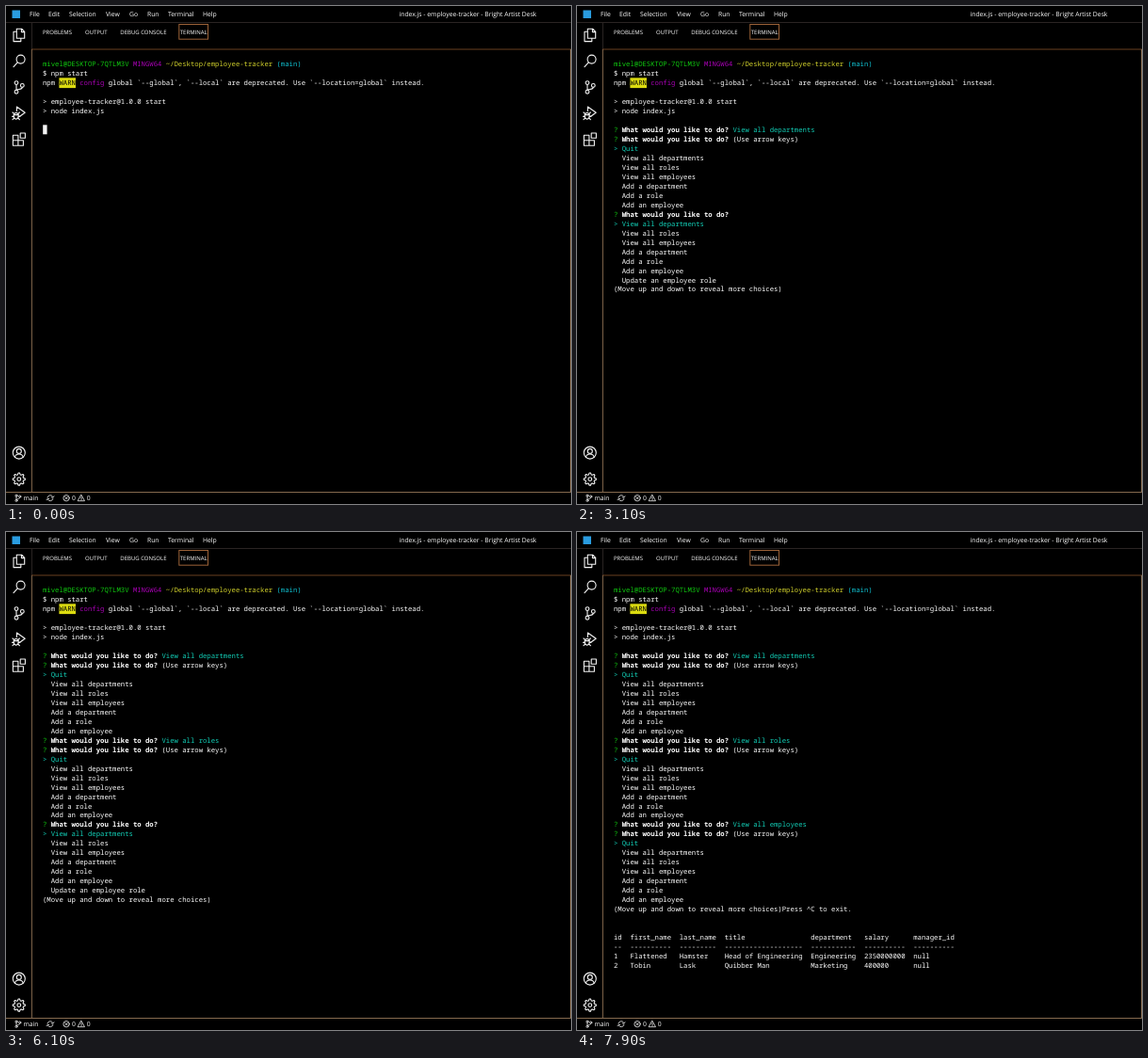
Write an HTML page that moves like this. It is 600 by 529 pixels and loops after 8 s.

```html
<!DOCTYPE html>
<html lang="en">
<head>
<meta charset="utf-8">
<title>employee-tracker</title>
<style>
html, body { margin: 0; width: 100%; height: 100%; overflow: hidden; background: #000; }
svg { display: block; width: 600px; height: 529px; background: #000; }
text { fill: #fff; white-space: pre; text-rendering: geometricPrecision; }
.ui text { font: 6.8px "Open Sans", "Noto Sans", sans-serif; }
.ui .tabs text { font-size: 6px; }
.term text { font: 7.27px "Noto Sans Mono", "DejaVu Sans Mono", monospace; }
.icon { fill: none; stroke: #f4f4f4; stroke-width: 1.1; stroke-linejoin: round; stroke-linecap: round; }
.small { stroke-width: .8; }
.g { fill: #10cc10; }
.m { fill: #a800b4; }
.y { fill: #d2d22c; }
.c { fill: #12d0b8; }
.e { fill: #10c4d4; }
.k { fill: #000; }
.b { font-weight: 700; }
</style>
</head>
<body>
<svg viewBox="0 0 600 529" xmlns="http://www.w3.org/2000/svg">
  <g fill="none">
    <path d="M0 17.5H600M27.5 17.5V46" stroke="#2a2423"/>
    <path d="M27 46H600" stroke="#6b4020"/>
    <path d="M27.4 46V516.5M599.5 46V516.5" stroke="#84694e"/>
    <path d="M0 516.5H600" stroke="#84694e"/>
    <rect x="183.8" y="19.5" width="30.7" height="15.7" stroke="#9c6238"/>
  </g>

  <rect x="6.5" y="4.5" width="8.5" height="8.5" fill="#2a9ce0"/>

  <g class="ui">
    <g id="menu"></g>
    <g id="tabs" class="tabs"></g>
    <g id="status"></g>
  </g>

  <!-- activity bar -->
  <g class="icon" transform="translate(0 -.4)">
    <path d="M11.3 24.6H16.6L19.7 27.7V34.6H11.3ZM16.4 24.8V28H19.5M11 27.6H8V38H15.8V34.8"/>
    <circle cx="15.6" cy="57" r="4.5"/><path d="M12.3 60.3L8 65"/>
    <circle cx="11" cy="82" r="1.9"/><circle cx="11" cy="91.6" r="1.9"/><circle cx="17.3" cy="84.8" r="1.9"/>
    <path d="M11 84V89.6M17.3 86.8C17 89 14.5 88.6 11.6 89.4"/>
    <path d="M11.4 112V107.4L20.2 113.6L14.6 117.6"/>
    <ellipse cx="10.7" cy="117.2" rx="2.5" ry="3.3"/>
    <path d="M8.3 116H13.1M7 113.4L8.7 115M14.4 113.4L12.7 115M6.6 117.8H8M13.4 117.8H14.8M7 121L8.8 119.4M14.4 121L12.6 119.4"/>
    <path d="M7.4 137.6H12.9V143.1H18.4V148.6H7.4ZM7.4 143.1H12.9V148.6"/>
    <rect x="15.2" y="135.4" width="5.2" height="5.2"/>
    <circle cx="13.8" cy="475" r="6.5"/><circle cx="13.8" cy="473.3" r="2.5"/>
    <path d="M9.5 479.7C10 475.3 17.6 475.3 18.1 479.7"/>
    <path id="gear"/><circle cx="13.8" cy="503" r="1.9"/>
  </g>

  <!-- status bar -->
  <g class="icon small" transform="translate(0 -.3)">
    <circle cx="11" cy="520.4" r="1.1"/><circle cx="11" cy="525.6" r="1.1"/><circle cx="14.7" cy="521.4" r="1.1"/>
    <path d="M11 521.5V524.5M14.7 522.5C14.5 524 12.5 523.7 11.4 524.6"/>
    <path d="M44 522.4A3.1 3.1 0 0 1 49.6 521.4M50 523.6A3.1 3.1 0 0 1 44.4 524.6M48.3 522.2L49.9 522.4L50.9 521M45.7 523.8L44.1 523.6L43.1 525"/>
    <circle cx="64.1" cy="523" r="3.2"/><path d="M62.8 521.7L65.4 524.3M65.4 521.7L62.8 524.3"/>
    <path d="M80 519.7L83.5 526H76.5ZM80 521.9V523.8M80 524.9V525"/>
  </g>

  <rect x="56.4" y="76.3" width="17.6" height="10.8" fill="#dcdc10"/>
  <g id="term" class="term"></g>
  <rect id="cursor" x="39.2" y="126.3" width="4.4" height="10" fill="#f4f4f4"/>
</svg>
<script>
const LOOP = 8000, LEFT = 39, TOP = 64.2, ROW = 9.97;
const $ = id => document.getElementById(id);
const esc = s => s.replace(/&/g, '&amp;').replace(/</g, '&lt;').replace(/>/g, '&gt;');
const labels = (id, y, items) => {
  $(id).innerHTML = items.map(([x, s]) => `<text x="${x}" y="${y}">${s}</text>`).join('');
};

labels('menu', 11.4, [[25, 'File'], [45, 'Edit'], [67, 'Selection'], [106, 'View'], [131, 'Go'],
  [150, 'Run'], [172, 'Terminal'], [209, 'Help'],
  [417.5, 'index.js - employee-tracker - Bright Artist Desk']]);
labels('tabs', 29.6, [[39, 'PROBLEMS'], [84, 'OUTPUT'], [121.3, 'DEBUG CONSOLE'], [184.8, 'TERMINAL']]);
labels('status', 525.2, [[18.5, 'main'], [70, '0'], [85.8, '0']]);

// eight-toothed outline: two points out, two points in per tooth
$('gear').setAttribute('d', 'M' + Array.from({ length: 32 }, (_, i) => {
  const a = (i - 0.5) * Math.PI / 16, r = i % 4 < 2 ? 6.6 : 4.9;
  return (13.8 + r * Math.cos(a)).toFixed(2) + ' ' + (503 + r * Math.sin(a)).toFixed(2);
}).join('L') + 'Z');

// a line is a list of [class, text] pieces
const plain = s => [['', s]];
const choices = ['Quit', 'View all departments', 'View all roles', 'View all employees',
  'Add a department', 'Add a role', 'Add an employee', 'Update an employee role'];
const more = '(Move up and down to reveal more choices)';

const head = [
  [['g', 'mivel@DESKTOP-7QTLM3V'], ['m', ' MINGW64'], ['y', ' ~/Desktop/employee-tracker'], ['e', ' (main)']],
  plain('$ npm start'),
  [['', 'npm '], ['k', 'WARN'], ['m', ' config'],
    ['', ' global `--global`, `--local` are deprecated. Use `--location=global` instead.']],
  [],
  plain('> employee-tracker@1.0.0 start'),
  plain('> node index.js'),
  []
];

const ask = (cls, tail) => [['g', '? '], ['b', 'What would you like to do? '], [cls, tail]];
const list = (first, active) => choices.slice(first, first + 7).map((s, i) =>
  first + i === active ? [['c', '> ' + s]] : plain('  ' + s));
const opening = [ask('', '(Use arrow keys)'), ...list(0, 0)];

function table(rows) {
  const width = rows[0].map((_, c) => Math.max(...rows.map(r => r[c].length)));
  const line = r => plain(r.map((s, c) => s.padEnd(width[c])).join('  '));
  return [line(rows[0]), line(width.map(w => '-'.repeat(w))), ...rows.slice(1).map(line)];
}

const dept = ['Engineering', 'Marketing'];
const title = ['Head of Engineering', 'Quibber Man'];
const pay = ['2350000000', '400000'];

// key presses, enter and query result of each question
const rounds = [
  { moves: [1800], enter: 2100, shown: 2300,
    rows: table([['id', 'name'], ['1', dept[0]], ['2', dept[1]]]) },
  { moves: [2900, 4400], enter: 4700, shown: 4800,
    rows: table([['id', 'title', 'department', 'salary'],
      ['1', title[0], dept[0], pay[0]], ['2', title[1], dept[1], pay[1]]]) },
  { moves: [5600, 6300, 6800], enter: 7100, shown: 7200,
    rows: table([['id', 'first_name', 'last_name', 'title', 'department', 'salary', 'manager_id'],
      ['1', 'Flattened', 'Hamster', title[0], dept[0], pay[0], 'null'],
      ['2', 'Tobin', 'Lask', title[1], dept[1], pay[1], 'null']]) },
  { moves: [LOOP] }
];

function screen(t) {
  const out = [...head];
  if (t < 1000) return out;
  for (let i = 0; i < rounds.length; i++) {
    const { moves, enter } = rounds[i], prev = rounds[i - 1];
    const active = moves.filter(m => t >= m).length;
    if (!active) {
      out.push(...opening);
      if (prev && t >= prev.shown) out.push(plain(more + 'Press ^C to exit.'), [], [], ...prev.rows);
      else out.push(plain(more));
      break;
    }
    if (prev) out.push(...opening);
    if (t < enter) {
      out.push(ask('', ''), ...list(1, active), plain(more));
      break;
    }
    out.push(ask('c', choices[active]));
  }
  return out;
}

let last = '';
function draw(t) {
  const html = screen(t).map((line, i) => line.length
    ? `<text x="${LEFT}" y="${(TOP + i * ROW).toFixed(2)}">` +
      line.map(([c, s]) => `<tspan class="${c}">${esc(s)}</tspan>`).join('') + '</text>'
    : '').join('');
  if (html !== last) $('term').innerHTML = last = html;
  $('cursor').style.display = t < 100 ? '' : 'none';
}

const start = performance.now();
function tick() {
  draw((performance.now() - start) % LOOP);
  requestAnimationFrame(tick);
}
draw(0);
requestAnimationFrame(tick);
</script>
</body>
</html>
```
